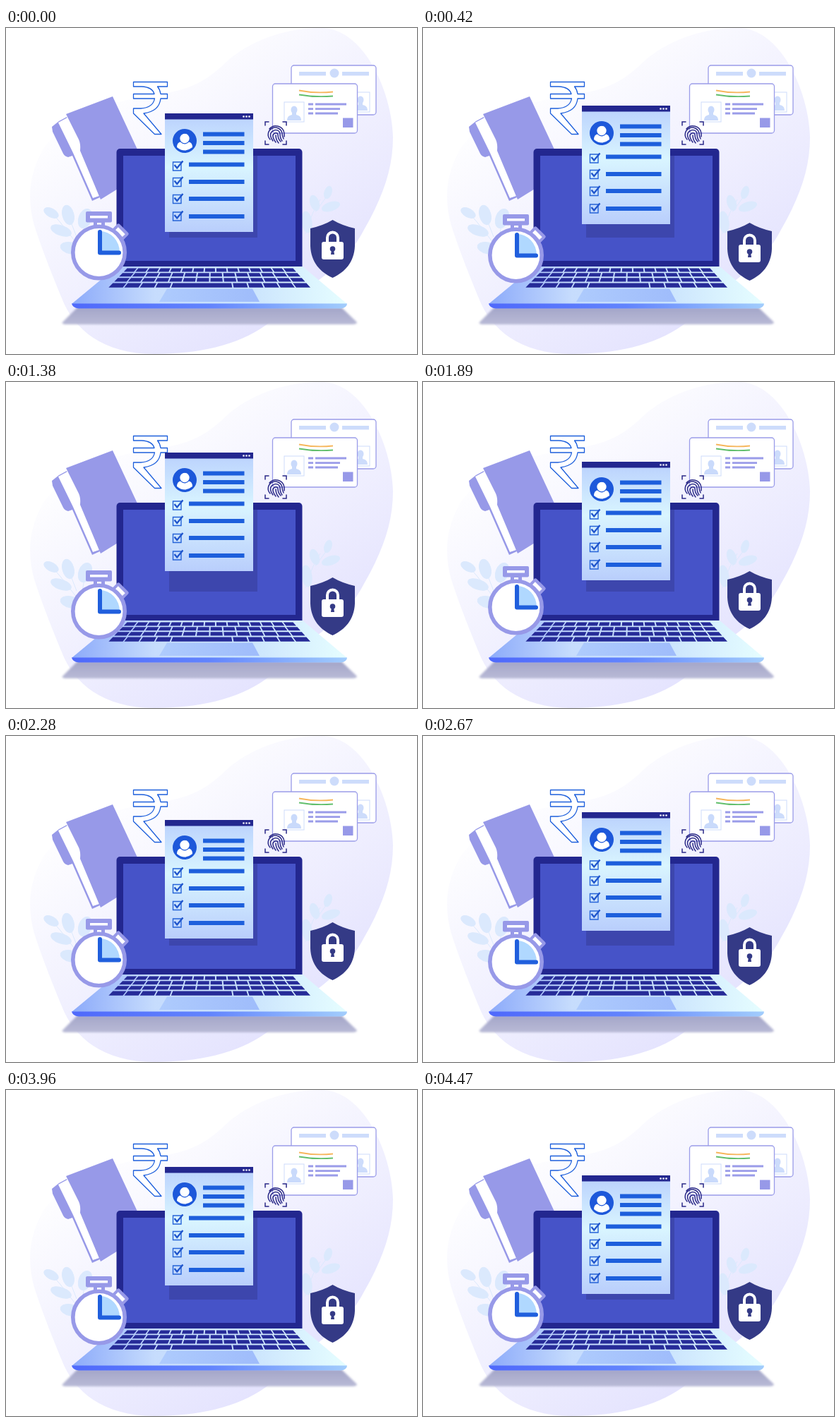
Animation, 582 px wide and 462 px high, one loop 4.5 s. Source, as an HTML page:

```html
<!DOCTYPE html>
<html lang="en">
<head>
<meta charset="utf-8">
<title>Online verification</title>
<style>
  html, body { margin: 0; width: 100%; height: 100%; overflow: hidden; background: #fff; }
  svg { display: block; width: 582px; height: 462px; }
</style>
</head>
<body>
<svg viewBox="0 0 582 462">
  <defs>
    <linearGradient id="blob" gradientUnits="userSpaceOnUse" x1="190" y1="60" x2="410" y2="390">
      <stop stop-color="#fefeff"/><stop offset="1" stop-color="#e5e4fe"/>
    </linearGradient>
    <linearGradient id="deck">
      <stop stop-color="#8caafa"/><stop offset=".3" stop-color="#c6dcfd"/><stop offset=".65" stop-color="#cbe4fd"/><stop offset="1" stop-color="#e6feff"/>
    </linearGradient>
    <linearGradient id="edge">
      <stop stop-color="#4f69fb"/><stop offset=".5" stop-color="#6284fd"/><stop offset="1" stop-color="#a2cdfc"/>
    </linearGradient>
    <linearGradient id="pad">
      <stop stop-color="#aecbfd"/><stop offset="1" stop-color="#9fbcfb"/>
    </linearGradient>
    <linearGradient id="shade" x2="0" y2="1">
      <stop stop-color="#a3a5c8"/><stop offset="1" stop-color="#b9bad6"/>
    </linearGradient>
    <linearGradient id="sheet" x2="0" y2="1">
      <stop stop-color="#b9d0fd"/><stop offset=".45" stop-color="#d9f5ff"/><stop offset="1" stop-color="#b9cefc"/>
    </linearGradient>
    <filter id="soft" x="-5%" y="-30%" width="110%" height="160%"><feGaussianBlur stdDeviation="1.8"/></filter>
    <g id="person">
      <ellipse cx="0" cy="-5" rx="4.5" ry="5.5"/>
      <path d="M-10 10Q-10 3-3 2V-1H3V2Q10 3 10 10Z"/>
    </g>
  </defs>

  <path fill="url(#blob)" d="M440 0C390 1 343 20 312 48C285 74 264 87 215 94C150 103 88 124 55 168C31 206 29 246 42 286C56 327 66 351 79 383C96 427 137 462 210 462C290 462 355 442 395 397C430 362 480 340 508 284C533 240 548 200 548 155C547 95 510 4 450 0Z"/>

  <g fill="#dbe9fd" stroke="#dbe9fd">
    <path fill="none" d="M66 263Q86 285 112 322M88 265L100 296M114 262L107 302M445 243Q434 258 424 292M456 236L438 261"/>
    <ellipse cx="64" cy="262" rx="11" ry="6" transform="rotate(28 64 262)"/>
    <ellipse cx="88" cy="265" rx="8" ry="14" transform="rotate(-14 88 265)"/>
    <ellipse cx="112" cy="270" rx="9" ry="14" transform="rotate(20 112 270)"/>
    <ellipse cx="78" cy="287" rx="15" ry="7" transform="rotate(20 78 287)"/>
    <ellipse cx="92" cy="312" rx="15" ry="8" transform="rotate(12 92 312)"/>
    <ellipse cx="437" cy="248" rx="6" ry="11" transform="rotate(-18 437 248)"/>
    <ellipse cx="456" cy="233" rx="5" ry="9" transform="rotate(18 456 233)"/>
    <ellipse cx="460" cy="253" rx="13" ry="6" transform="rotate(-18 460 253)"/>
    <ellipse cx="426" cy="275" rx="7" ry="15" transform="rotate(-8 426 275)"/>
  </g>

  <g fill="#9799e8">
    <path d="M65 140L75 132L86 126L133 240L122 245L94 181L88 183Q83 182 81 178L66 147Z"/>
    <path fill="#fff" d="M74 134L87 127L103 157L106 173L132 238L123 241L95 177Z"/>
    <path d="M85 122L151 97L200 202L134 243L105 174Q106 164 103 158Z"/>
  </g>

  <path fill="#fff" stroke="#1d5fdc" stroke-width="1.300" stroke-linejoin="round" d="M180.500 76.500H228.500V83H214.500Q218 87 219 93.500H228.500V100H219Q217 118 195 121L220 150.500H210.500L180.500 121V114H191Q208 113 210.500 100H180.500V93.500H210Q207 83.500 192 83H180.500Z"/>

  <g fill="#fff" stroke="#9a9ce9" stroke-width="1.300">
    <rect x="404" y="53" width="120" height="70" rx="4"/>
    <g fill="#cddcfb" stroke="none">
      <path d="M415 62h38v5.500h-38zM476 62h38v5.500h-38z"/>
      <circle cx="465" cy="64" r="6.500"/>
      <use href="#person" x="502" y="107"/>
    </g>
    <rect x="487" y="91" width="28" height="28" fill="none" stroke="#cddcfb" stroke-width="1"/>
    <rect x="377.500" y="79" width="120" height="70" rx="4"/>
    <rect x="394" y="105" width="28" height="28" stroke="#cddcfb" stroke-width="1"/>
    <use href="#person" x="408" y="121" fill="#c9dafb" stroke="none"/>
    <g fill="none" stroke-width="1.800">
      <path stroke="#f6b65c" d="M415 88.500Q437 93 463 90.500"/>
      <path stroke="#62bf6d" d="M415 94.500Q437 98.500 463 96.500"/>
    </g>
    <path stroke-width="2.800" d="M428 108h7m3 0h44M428 114.700h7m3 0h35M428 121h7m3 0h32"/>
    <path fill="#9799e8" stroke="none" d="M477 127.500h14.500v13.500h-14.500z"/>
  </g>

  <g fill="none" stroke="#2b2a88" stroke-width="1.500" stroke-linecap="round">
    <path d="M367 138V133H372M392 133H397V138M397 160V165H392M372 165H367V160"/>
    <path d="M373 143A12 12 0 0 1 394 149V154M374 158A10 10 0 1 1 391 149Q391 153 393 157M378 160Q371 150 378 146A6 6 0 0 1 388 150Q388 156 391 160M382 162Q375 152 380 149.500A3 3 0 0 1 385 151Q385 157 389 161M382 152Q382 158 386 163"/>
  </g>

  <path fill="url(#shade)" filter="url(#soft)" d="M101 396H475L497 417Q497 420 490 420H87Q78 420 80 417Z"/>
  <rect x="156.500" y="171" width="263" height="172" rx="5" fill="#23278f"/>
  <path fill="#4653c8" d="M166 181H410V330H166Z"/>
  <path fill="#3d46ad" d="M231 181H356V297H231Z"/>
  <path fill="url(#deck)" d="M157 338H420L483 391H93Z"/>
  <path fill="url(#edge)" d="M93 390.500H483Q483 396.500 474 397.500H103Q94 396.500 93 390.500Z"/>
  <path id="keys" fill="#262b98"/>
  <path fill="url(#pad)" d="M228 369.500H349L359 388H217Z"/>

  <g id="doc">
    <path fill="url(#sheet)" d="M225 0H350V168H225Z"/>
    <path fill="#23278f" d="M225 0H350V8.500H225Z"/>
    <g fill="#fff"><circle cx="336.500" cy="4.500" r="1.300"/><circle cx="340.500" cy="4.500" r="1.300"/><circle cx="344.500" cy="4.500" r="1.300"/></g>
    <circle cx="253" cy="39" r="17" fill="#1d58da"/>
    <path fill="#fff" d="M242 48Q242 41 248 40H258Q264 41 264 48Q253 57 242 48Z"/>
    <circle cx="253" cy="35.500" r="7.300" fill="#fff" stroke="#1d58da" stroke-width="1.200"/>
    <path stroke="#1d5fdc" stroke-width="5.800" d="M279 29.500h58.500M279 42h58.500M279 54.500h58.500M259 72.500h78.500M259 97h78.500M259 121h78.500M259 146h78.500"/>
    <path id="boxes" fill="none" stroke="#2563d8" stroke-width="1.400"/>
    <path id="ticks" fill="none" stroke="#1f55cc" stroke-width="2.300"/>
  </g>

  <g id="watch" fill="#9799e8">
    <path d="M124 13H140V24H124Z"/>
    <path fill="#fff" d="M129 16h6v4h-6z"/>
    <rect x="113" width="37" height="15.500" rx="2"/>
    <path fill="#fff" d="M119 6h25v3.500h-25z"/>
    <g transform="translate(162 29) rotate(45)">
      <path d="M-5 4H5V12H-5Z"/>
      <rect x="-11" y="-7" width="22" height="14" rx="2.500"/>
      <path fill="#fff" d="M-7-2.500H7V3H-7Z"/>
    </g>
    <circle cx="131.500" cy="58" r="36.700" fill="#fff" stroke="#9799e8" stroke-width="5.600"/>
    <path fill="#b0d8ff" d="M133 28A28 30 0 0 1 161 58H133Z"/>
    <path fill="none" stroke="#205fdd" stroke-width="6" stroke-linecap="round" stroke-linejoin="round" d="M133 29V58.500H160"/>
  </g>

  <g id="shield" fill="#343a86">
    <path d="M462.500 0Q476 8 494 12V37C493 60 480 74 462.500 82C445 74 432 60 431 37V12Q449 8 462.500 0Z"/>
    <path fill="none" stroke="#fff" stroke-width="4" d="M455 33V25A7.500 7.500 0 0 1 470 25V33"/>
    <rect x="447" y="31" width="31" height="25" rx="3" fill="#fff"/>
    <circle cx="462.500" cy="41" r="3.800"/>
    <path d="M461 42h3l1 7h-5z"/>
  </g>
</svg>
<script>
const el = id => document.getElementById(id);

// Keyboard: rows widen towards the viewer
const left = y => 172 - (y - 340) * .96;
const right = y => 408 + (y - 340) * .9;
const rows = [[340.5, 5, 15], [347.2, 5.1, 14], [354.2, 5.3, 14], [361.5, 6.3, 13]];
let keys = '';
rows.forEach(([top, height, count], row) => {
  const at = (share, y) => left(y) + share * (right(y) - left(y));
  const bottom = top + height;
  for (let i = 0; i < count; i++) {
    const space = row === 3 && i > 3 && i < 8;
    if (space && i > 4) continue;
    const a = i / count, b = (space ? 8 : i + 1) / count;
    keys += `M${at(a, top)} ${top}L${at(b, top) - 2} ${top}L${at(b, bottom) - 2} ${bottom}L${at(a, bottom)} ${bottom}Z`;
  }
});
el('keys').setAttribute('d', keys);

const checks = [69, 91.5, 115.5, 140];
el('boxes').setAttribute('d', checks.map(y => `M236.500 ${y}h11.500v12h-11.500z`).join(''));
el('ticks').setAttribute('d', checks.map(y => `M238.500 ${y + 4}l3.700 4.500l8.300-10`).join(''));

// Vertical position of each floating part at the shared key times
const times = [0, 1095, 2190, 3270, 4470];
const tracks = {
  doc: [121, 92, 121, 92, 121],
  watch: [260, 270, 257.6, 268.3, 260],
  shield: [272, 282.2, 262.8, 282, 272]
};

function draw(now) {
  const t = Math.min(now % 4500, 4470);
  let i = 0;
  while (i < 3 && t >= times[i + 1]) i++;
  const share = (t - times[i]) / (times[i + 1] - times[i]);
  for (const id in tracks) {
    const [from, to] = tracks[id].slice(i);
    el(id).setAttribute('transform', `translate(0 ${Math.round(from + (to - from) * share)})`);
  }
}

const start = performance.now();
(function loop() {
  draw(performance.now() - start);
  requestAnimationFrame(loop);
})();
</script>
</body>
</html>
```
